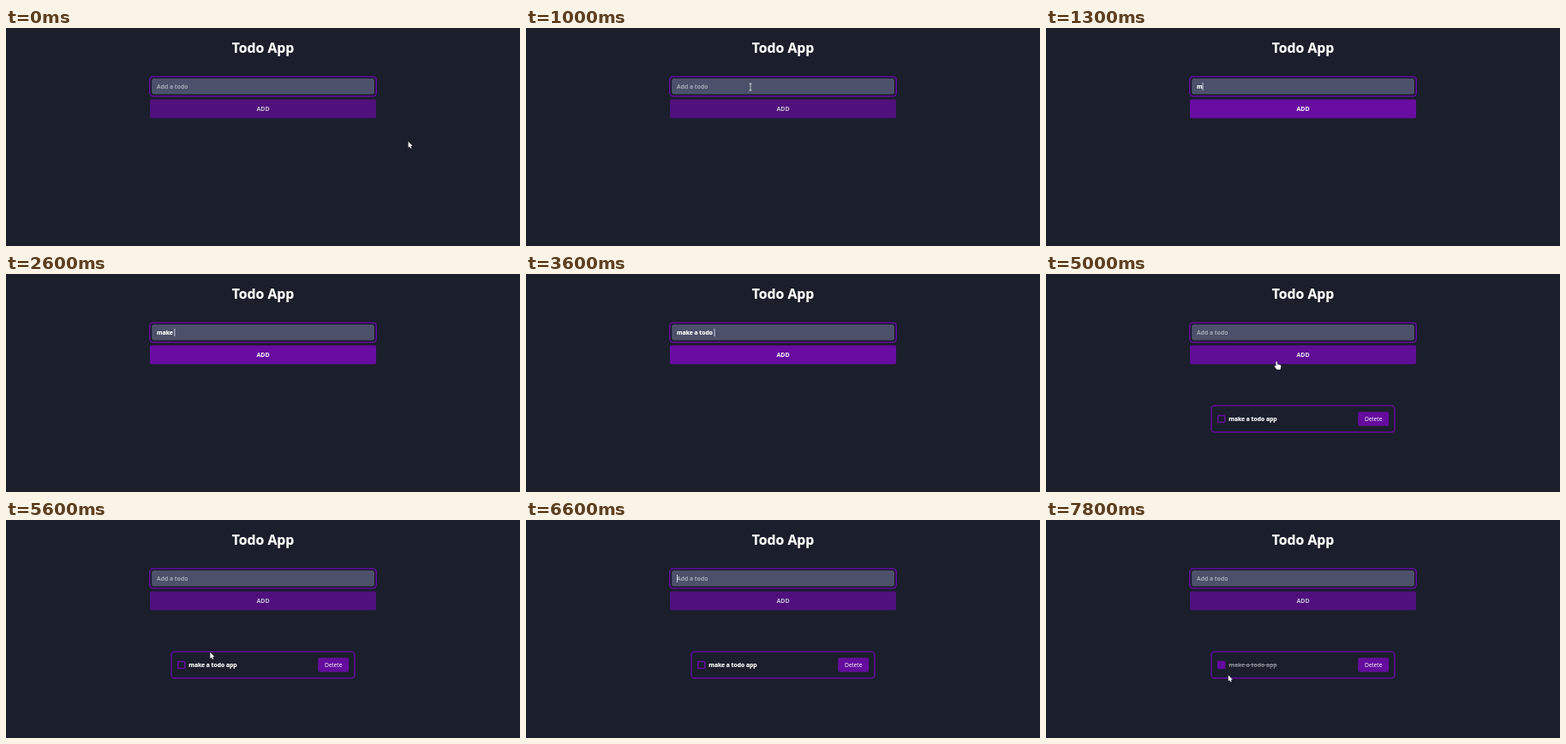
These frames come from a looping animation (600x255 px, 8000 ms). An HTML page:

```html
<!DOCTYPE html>
<html lang="en">
<head>
<meta charset="utf-8">
<title>Todo App</title>
<style>
  html, body { margin: 0; width: 100%; height: 100%; overflow: hidden; background: #1b1e2b; }
  svg { display: block; width: 100vw; height: 100vh; }
  text { font: 700 6.75px "Open Sans", "Noto Sans", sans-serif; fill: #fff; white-space: pre; }
  .title { font-size: 15.8px; }
  .add { font-size: 7px; }
  .del { font-size: 6.8px; font-weight: 500; }
  .mid { text-anchor: middle; }
  .bold { stroke: #fff; stroke-width: .18; }
  .line { fill: none; stroke: #620d9f; stroke-width: 1.5; }
</style>
</head>
<body>
<svg viewBox="0 0 600 255">
  <text class="title mid bold" x="300" y="28.8">Todo App</text>

  <rect class="line" x="167.8" y="56.9" width="264.4" height="22.9" rx="4"/>
  <rect x="169.6" y="58.5" width="260.9" height="19.6" rx="2.8" fill="#4c506a" stroke="#11131d" stroke-width=".9"/>
  <text id="field" x="176" y="71.3"></text>
  <rect id="caret" y="64" width=".8" height="9" fill="#e8e8f0"/>

  <rect id="button" x="168" y="83.5" width="264" height="22" rx="1.8"/>
  <text id="add" class="add mid" x="300" y="97.3">ADD</text>

  <g id="item">
    <rect class="line" x="193" y="154.1" width="214" height="30.9" rx="3.8"/>
    <rect id="box" class="line" x="200.7" y="165.5" width="8" height="8" rx=".8"/>
    <text id="label" x="213.3" y="172">make a todo app</text>
    <rect id="strike" x="213.3" y="169.2" width="56" height=".8" fill="#85878f"/>
    <rect x="364.2" y="161.3" width="36" height="16.5" rx="2" fill="#650c9e"/>
    <text class="del mid" x="382.2" y="172">Delete</text>
  </g>

  <g id="mouse" fill="#fff" stroke="#10121a" stroke-width=".5" stroke-linejoin="round" paint-order="stroke">
    <path id="arrow" d="M0 0V7.2L1.6 5.8L2.7 8.2L3.9 7.7L2.9 5.3H5Z"/>
    <path id="hand" d="M2 .8Q2.8 -.2 3.5 .8V3.6L7 4.5Q8 4.9 7.8 6.2L7 9.8H3L.2 6.2Q0 5 1.1 5.2L2 6Z"/>
    <path id="beam" d="M-1.5 -4H1.5M0 -4V4M-1.5 4H1.5" stroke="#fff" stroke-width=".7"/>
  </g>
</svg>
<script>
const LOOP = 8000, STEP = 100;
const $ = id => document.getElementById(id);

// time, field content
const typing = [
  [0, ""], [1300, "m"], [1500, "mk"], [1700, "mka"], [1900, "mkae"], [2000, "mkae "],
  [2200, "mka"], [2300, "m"], [2400, "ma"], [2500, "mak"], [2600, "make "],
  [2900, "make a"], [3000, "make a "], [3200, "make a t"], [3300, "make a to"],
  [3400, "make a tod"], [3500, "make a todo"], [3600, "make a todo "],
  [3800, "make a todo a"], [3900, "make a todo ap"], [4200, "make a todo app"], [5000, ""]
];
// time, caret shown
const blinks = [[0, 0], [500, 1], [1000, 0], [1300, 1], [4800, 0], [6600, 1], [6900, 0]];
// time, pointer, x, y
const moves = [
  [0, "arrow", 469.6, 132.8], [200, "arrow", 425, 119], [300, "arrow", 350, 91],
  [400, "beam", 290, 72], [500, "beam", 262, 69], [1300, ""],
  [4800, "arrow", 272, 114], [4900, "hand", 266.5, 102],
  [5600, "arrow", 238.3, 154.8], [5700, "arrow", 213, 163], [5800, "arrow", 194, 169],
  [6000, "arrow", 190, 167], [6100, "arrow", 193, 161], [6200, "arrow", 198, 164],
  [6300, "arrow", 200.5, 168.5], [6600, ""],
  [6900, "arrow", 200, 165], [7000, "arrow", 202, 168], [7400, "arrow", 204, 171],
  [7500, "arrow", 207, 174], [7600, "arrow", 210, 177], [7700, "arrow", 212, 179.5],
  [7800, "arrow", 212.8, 181.4]
];

const at = (table, t) => table.findLast(row => row[0] <= t);
const ramp = (t, from, to) => Math.min(1, Math.max(0, (t - from) / (to - from)));
const mix = (a, b, k) => `rgb(${a.map((v, i) => Math.round(v + (b[i] - v) * k))})`;
const show = (id, on) => { $(id).style.display = on ? "" : "none"; };

function draw(t) {
  const text = at(typing, t)[1], field = $("field");
  field.textContent = text || "Add a todo";
  field.style.fill = text ? "#fff" : "#a7a9b6";
  field.classList.toggle("bold", text !== "");
  show("caret", at(blinks, t)[1]);
  $("caret").setAttribute("x", 176 + (text ? field.getComputedTextLength() : 0));

  const lit = t < 1300 ? 0 : 1 - ramp(t, 4900, 5200);
  $("button").style.fill = mix([80, 17, 124], [104, 12, 162], lit);
  $("add").style.fill = mix([201, 196, 212], [255, 255, 255], lit);

  const done = t >= 7000;
  show("item", t >= 5000);
  show("strike", done);
  $("box").style.fill = done ? "#650c9e" : "none";
  $("label").style.fill = mix([255, 255, 255], [133, 135, 143], ramp(t, 6900, 7200));
  $("label").classList.toggle("bold", !done);

  const [, shape, x = 0, y = 0] = at(moves, t);
  for (const id of ["arrow", "hand", "beam"]) show(id, id === shape);
  $("mouse").setAttribute("transform", `translate(${x} ${y})`);
}

const start = performance.now();
let last = -1;
function tick(now) {
  const t = Math.floor(Math.max(0, now - start) % LOOP / STEP) * STEP;
  if (t !== last) draw(last = t);
  requestAnimationFrame(tick);
}
draw(0);
requestAnimationFrame(tick);
</script>
</body>
</html>
```
